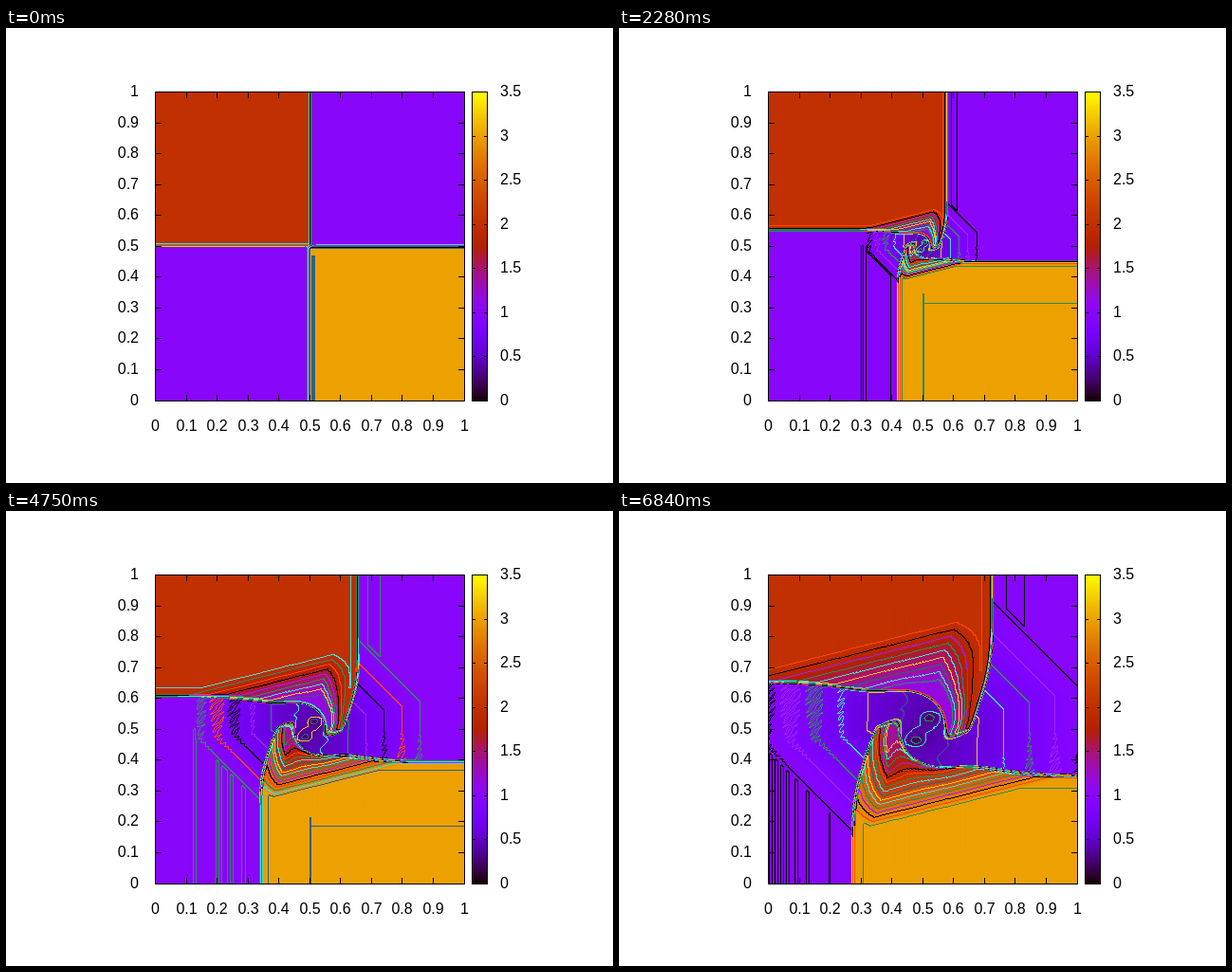
Recreate the animation shown at these times as an HTML page with a canvas. Size 640 by 480 pixels, loop 7030 ms.

```html
<!DOCTYPE html>
<html lang="en">
<head>
<meta charset="utf-8">
<title>Density map</title>
<style>
html, body { margin: 0; width: 100%; height: 100%; overflow: hidden; background: #fff; }
canvas { display: block; width: 640px; height: 480px; }
</style>
</head>
<body>
<canvas id="stage" width="640" height="480"></canvas>
<script>
const ctx = document.getElementById('stage').getContext('2d');
const STEP = 190, STEPS = 37;
const LEFT = 157, TOP = 67, SIZE = 326, TICK = 32.55;
const CX = 320.5, CY = 230.5;

// Contour colours repeat in this order from high levels to low ones.
const INKS = ['#000000', '#a020f0', '#2e8b57', '#40e0d0', '#ffc020', '#306080', '#40e0d0', '#2e8b57', '#ff4500'];
const INK_RGB = INKS.map(hex => [1, 3, 5].map(i => parseInt(hex.slice(i, i + 2), 16)));
const LEVEL_GAP = .1, LEVEL_BASE = .98;

const UPPER = { x: 36, y: 114, depth: 62, high: 2, low: 1.15 };
const LOWER = { x: 55, y: 103, depth: 72, high: 3, low: 1.4 };

const clamp = v => Math.min(1, Math.max(0, v));
const noise = n => { const v = Math.sin(n * 127.1 + 11.7) * 43758.5453; return v - Math.floor(v); };

function shade(value) {
  const x = value / 3.5;
  return [Math.sqrt(x), x ** 3, Math.max(0, Math.sin(2 * Math.PI * x))].map(v => Math.round(v * 255));
}

// Contact curves of the upper wedge; the lower wedge is its half turn.
const rightEdge = v => 73 - 6.05e-5 * Math.max(0, v + 120) ** 2.75;
const bottomEdge = u => -50 + 9.07e-4 * Math.max(0, u + 165) ** 2;

function inWedge(u, v, scale) {
  const cover = gap => clamp(.5 + gap * scale / 4);
  return cover(rightEdge(v) - u) * cover(bottomEdge(u) - v);
}

// Density falls in chevrons behind a bent shock front.
function wedgeDensity(u, v, { x, y, depth, high, low }) {
  const drop = v + y, ridge = x - .4 * drop;
  const behind = drop - .28 * Math.max(0, ridge - u)
    - Math.max(.3, .3 + .016 * drop) * Math.max(0, u - ridge);
  const rim = u > 62 || v > -62 ? .03 : 0;
  return high - Math.max(rim, (high - low) * clamp(behind / depth));
}

// The two fans sink towards the centre, with grid ripples at their fronts.
function fanDensity(u, v, px, py) {
  const reach = Math.max(Math.abs(u), .8 * (u - v), .92 * (v - u));
  const inside = 172 - reach;
  if (inside > 0) {
    const hatch = u < 0
      ? .04 * clamp((-u - 70) / 50) * clamp((40 - v) / 60)
      : .025 * clamp((u - 80) / 50) * clamp(v / 40);
    return 1 - .0037 * inside + hatch * clamp(inside / 8) * Math.sin((px + py) * .9 + Math.sin(py * .5));
  }
  const leftStripes = u > -188 && u < -97 && v > 0 && noise(Math.floor(px / 3)) > .5;
  const rightBand = u > 88 && u < 107 && v < -100;
  return leftStripes || rightBand ? .97 : 1;
}

function density(px, py, scale) {
  const x = (px - CX) / scale, y = (py - CY) / scale;
  const turn = 2.2 * Math.exp(-(x * x + y * y) / 1000);
  const cos = Math.cos(turn), sin = Math.sin(turn);
  const u = x * cos + y * sin, v = y * cos - x * sin;

  let value = fanDensity(u, v, px, py);
  const upper = inWedge(u, v, scale), lower = inWedge(-u, -v, scale);
  const jitter = .012 * Math.sin(px * 1.7) * clamp(1 - Math.hypot(x, y) / 160);
  value += upper * (wedgeDensity(u, v, UPPER) + jitter - value);
  value += lower * (wedgeDensity(-u, -v, LOWER) + jitter - value);

  const core = side => Math.exp(-((x - 7 * side) ** 2 + 2 * (y + 12 * side) ** 2) / 60);
  return Math.max(.05, value - .2 * (core(1) + core(-1)));
}

const inkPhase = step => 8 - Math.round(Math.cos((step - 22.5) / 13.5 * Math.PI));
const inkIndex = (level, step) => (((inkPhase(step) - level) % INKS.length) + INKS.length) % INKS.length;

function drawField(step) {
  const scale = (step + .5) / 36.5, row = SIZE + 1;
  const values = new Float32Array(row * row);
  for (let i = 0; i < values.length; i++) {
    values[i] = density(LEFT + i % row + .5, TOP + Math.floor(i / row) + .5, scale);
  }
  const levels = values.map(v => Math.floor((v - LEVEL_BASE) / LEVEL_GAP + 1e-4));
  const image = ctx.createImageData(row, row);
  for (let i = 0; i < values.length; i++) {
    const right = (i + 1) % row ? levels[i + 1] : levels[i];
    const below = i + row < levels.length ? levels[i + row] : levels[i];
    const crossed = right !== levels[i] || below !== levels[i];
    const rgb = crossed
      ? INK_RGB[inkIndex(Math.max(levels[i], right, below), step)]
      : shade(values[i]);
    image.data.set([...rgb, 255], i * 4);
  }
  ctx.putImageData(image, LEFT, TOP);
}

// A trace of the initial corner, sinking at a steady pace.
function drawStartTrace(step) {
  if (step > 31) return;
  const y = Math.round(240 + 3.3 * step), end = TOP + SIZE;
  ctx.fillStyle = INKS[inkIndex(20, step)];
  ctx.fillRect(step ? 320 : 322, y, step ? 2 : 4, end - y);
  if (step) ctx.fillRect(322, Math.round(251 + 3.25 * step), LEFT + SIZE - 322, 1);
}

function drawAxes() {
  const right = LEFT + SIZE, bottom = TOP + SIZE;
  for (let i = 0; i < SIZE; i++) {
    ctx.fillStyle = `rgb(${shade(3.5 * (1 - i / SIZE))})`;
    ctx.fillRect(491, TOP + i, 17, 1);
  }
  ctx.strokeStyle = ctx.fillStyle = '#000';
  ctx.lineWidth = 1;
  ctx.strokeRect(LEFT + .5, TOP + .5, SIZE, SIZE);
  ctx.strokeRect(491.5, TOP + .5, 16, SIZE);
  ctx.font = '16px "Liberation Sans", Arial, sans-serif';
  for (let i = 0; i <= 10; i++) {
    const x = Math.round(LEFT + TICK * i), y = Math.round(TOP + TICK * (10 - i));
    const label = String(i / 10);
    ctx.fillRect(x, TOP, 1, 7);
    ctx.fillRect(x, bottom - 6, 1, 7);
    ctx.fillRect(LEFT, y, 7, 1);
    ctx.fillRect(right - 6, y, 7, 1);
    ctx.textAlign = 'center';
    ctx.fillText(label, x + .5, 425);
    ctx.textAlign = 'right';
    ctx.fillText(label, 140, y + 5);
  }
  ctx.textAlign = 'left';
  for (let i = 0; i <= 7; i++) {
    const y = bottom - Math.round(SIZE * i / 7);
    ctx.fillRect(491, y, 4, 1);
    ctx.fillRect(504, y, 4, 1);
    ctx.fillText(String(i / 2), 521, y + 5);
  }
}

function draw(step) {
  ctx.fillStyle = '#fff';
  ctx.fillRect(0, 0, 640, 480);
  drawField(step);
  drawStartTrace(step);
  drawAxes();
}

const start = performance.now();
let shown = -1;
function tick() {
  const step = Math.floor((performance.now() - start) / STEP) % STEPS;
  if (step !== shown) draw(shown = step);
  requestAnimationFrame(tick);
}
tick();
</script>
</body>
</html>
```
